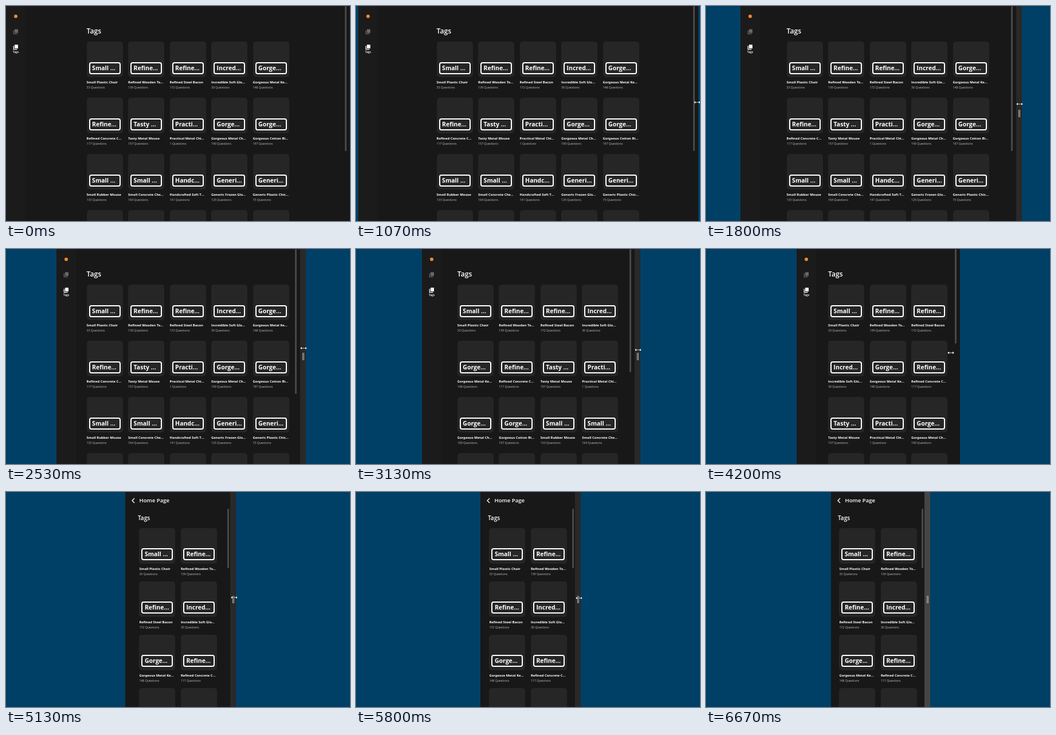
Write an HTML page that moves like this. It is 600x375 px and loops after 7.07 s.

```html
<!DOCTYPE html>
<html lang="en">
<head>
<meta charset="utf-8">
<title>Responsive tag grid</title>
<style>
  html, body { margin: 0; width: 100%; height: 100%; overflow: hidden; background: #004066; }
  #stage { position: relative; width: 600px; height: 375px; overflow: hidden; background: #004066;
    font-family: "Open Sans", "Noto Sans", sans-serif; color: #fff; white-space: nowrap; }
  #stage div, #stage svg { position: absolute; }
  #panel { top: 0; height: 375px; background: #181818; }
  #side { top: 0; width: 34px; height: 375px; background: #1b1b1b; }
  #logo { left: 14px; top: 15px; width: 6px; height: 6px; border-radius: 50%; background: #f28a2e; }
  #side svg { left: 12px; width: 10px; height: 10px; }
  #side .tag { left: 0; top: 75.5px; width: 34px; text-align: center; font: 600 5px/8px "Open Sans", sans-serif; }
  #bar { background: #484848; border-radius: 1.5px; }
  #head { font-weight: 600; line-height: 16px; }
  #top { top: 0; }
  #top .name { left: 24.5px; top: 7px; font-size: 9.6px; line-height: 16px; font-weight: 600; }
  #top svg { left: 10px; top: 10px; }
  .card { width: 63px; height: 62px; border-radius: 5px; background: #262626; }
  .card .label { left: 4px; top: 35.5px; width: 51px; height: 17px; border: 2px solid #fff; border-radius: 4px;
    font: 700 10.5px/17px "Open Sans", sans-serif; text-indent: 3.5px; }
  .card .title { left: 0; top: 67.3px; font: 700 5.9px/8px "Open Sans", sans-serif; }
  .card .count { left: 0; top: 76px; font: 500 5.2px/8px "Open Sans", sans-serif; color: #c4c4c4; }
  #grip { top: 0; width: 10px; height: 375px; }
  #grip::after { content: ""; position: absolute; left: 4px; top: 181px; width: 1px; height: 13px;
    border: solid #b8b8b8; border-width: 0 1px; }
  #cursor { width: 14px; height: 8px; }
</style>
</head>
<body>
<div id="stage">
  <div id="panel"></div>
  <div id="side">
    <div id="logo"></div>
    <svg style="top:39.5px" viewBox="0 0 10 10" fill="#686868"><path d="M3 .5h6v6.5H3zM.7 2.5H2V8h5.500v1.300H.7z"/></svg>
    <svg style="top:66.5px" viewBox="0 0 10 10" fill="#fff"><path d="M3 .5h6v6.5H3zM.7 2.5H2V8h5.500v1.300H.7z"/></svg>
    <div class="tag">Tags</div>
  </div>
  <div id="top">
    <svg width="8" height="10" fill="none" stroke="#fff" stroke-width="1.4"><path d="M6 1L2 5l4 4"/></svg>
    <div class="name">Home Page</div>
  </div>
  <div id="head">Tags</div>
  <div id="grid"></div>
  <div id="bar"></div>
  <div id="grip"></div>
  <svg id="cursor" viewBox="-7 -4 14 8"><path d="M-6 0l3-2.800v2h6v-2L6 0 3 2.800v-2h-6v2z" fill="#fff" stroke="#111" stroke-width=".6"/></svg>
</div>
<script>
const LOOP = 7070, STEP = 200 / 3;
const $ = id => document.getElementById(id);
const [panel, side, topBar, head, grid, bar, grip, cursor] =
  ['panel', 'side', 'top', 'head', 'grid', 'bar', 'grip', 'cursor'].map($);

const tags = [
  ['Small Plastic Chair', 33], ['Refined Wooden To…', 139], ['Refined Steel Bacon', 172],
  ['Incredible Soft Glo…', 30], ['Gorgeous Metal Ke…', 148], ['Refined Concrete C…', 117],
  ['Tasty Metal Mouse', 157], ['Practical Metal Chi…', 1], ['Gorgeous Metal Ch…', 190],
  ['Gorgeous Cotton Bi…', 197], ['Small Rubber Mouse', 133], ['Small Concrete Che…', 164],
  ['Handcrafted Soft T…', 141], ['Generic Frozen Glo…', 125], ['Generic Plastic Chic…', 73],
  ...Array(5).fill(['', 0])
];

function add(parent, cls, text = '') {
  const el = document.createElement('div');
  el.className = cls;
  el.textContent = text;
  parent.append(el);
  return el;
}

const shorten = name => name.slice(0, /^(Small|Gorge|Tasty|Handc)/.test(name) ? 5 : 6)
  + (/^(Small|Tasty)/.test(name) ? ' …' : '…');

const cards = tags.map(([name, count]) => {
  const card = add(grid, 'card');
  add(card, 'label', shorten(name));
  add(card, 'title', name);
  add(card, 'count', count + ' Questions');
  return card;
});

// Dragged inset of the window: [ms, px]
const drag = [[867, 0], [1533, 37], [1800, 59], [2267, 77], [2533, 87.5], [3000, 110.5], [3133, 114.5],
  [3733, 140.5], [4200, 179], [4533, 190], [5133, 208.5], [5200, 211], [5533, 216], [5800, 217.5], [6333, 218.5]];
const pointerY = [[867, 168], [1800, 171], [3133, 176], [4200, 181], [5133, 184], [6333, 186]];

function track(keys, t) {
  if (t <= keys[0][0]) return keys[0][1];
  for (let i = 1; i < keys.length; i++) {
    const [a, x] = keys[i - 1], [b, y] = keys[i];
    if (t <= b) return x + (y - x) * (t - a) / (b - a);
  }
  return keys[keys.length - 1][1];
}

function place(el, x, y, w, h) {
  el.style.left = x + 'px';
  el.style.top = y + 'px';
  if (w) el.style.width = w + 'px';
  if (h) el.style.height = h + 'px';
}
const show = (el, on) => { el.style.display = on ? 'block' : 'none'; };

let columns = 0;
function layout(cols) {
  if (cols === columns) return;
  columns = cols;
  const phone = cols === 2;
  const x0 = phone ? 232.4 : 140.6 + (5 - cols) * 36.25;
  const y0 = phone ? 62.5 : 62, pitch = phone ? 93 : 98;
  cards.forEach((card, i) => place(card, x0 + i % cols * 72.5, y0 + Math.floor(i / cols) * pitch));
  place(head, phone ? 230 : x0, phone ? 37 : 35.5);
  head.style.fontSize = phone ? '10px' : '12.1px';
  show(side, !phone);
  show(topBar, phone);
}

function render(now) {
  const time = now % LOOP;
  const t = Math.floor((time + 5) / STEP) * STEP;
  const target = track(drag, t);
  const late = t < 1590;
  const stuck = t > 3930 && t < 4530;
  const inset = late ? Math.max(0, target - 8) : stuck ? 157.5 : target;
  const cols = inset > 185 ? 2 : inset > 134 ? 3 : inset > 97 ? 4 : 5;
  const phone = cols === 2;
  const snap = phone ? Math.floor : Math.ceil;
  const left = snap(inset), right = snap(600 - inset);

  layout(cols);
  place(panel, left, 0, right - left);
  place(side, left, 0);
  place(topBar, left, 0);
  if (phone) place(bar, right - 5, 29, 3, 104);
  else place(bar, right - 9, 0, 3, { 5: 253, 4: 215, 3: 165 }[cols]);

  show(grip, !late && !stuck);
  place(grip, right, 0);
  const glow = Math.min(1, Math.max(0, (t - 6267) / 400));
  const grey = Math.round(41 + 28 * glow);
  grip.style.background = `rgb(${grey},${grey},${grey})`;

  show(cursor, t > 860 && t < 6330);
  place(cursor, 599.2 - target, track(pointerY, t) - 4.5);
}

function tick() {
  render(performance.now());
  requestAnimationFrame(tick);
}
tick();
</script>
</body>
</html>
```
